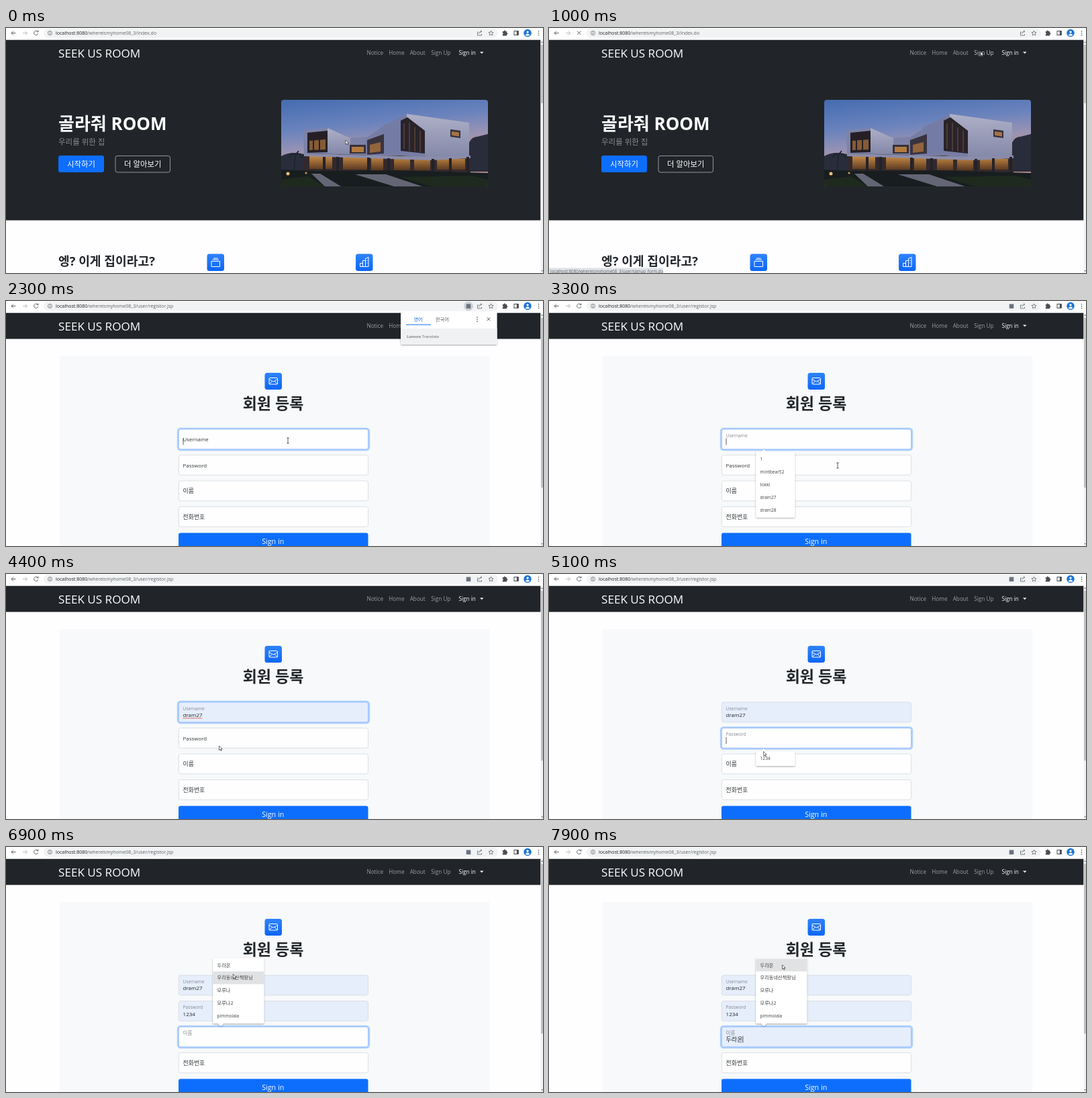
An HTML page for the animation above (8 s loop, 800 by 365 pixels).

```html
<!DOCTYPE html>
<html lang="ko">
<head>
<meta charset="utf-8">
<title>Sign up walkthrough</title>
<style>
  html, body { margin: 0; width: 100%; height: 100%; overflow: hidden; background: #fff; }
  svg { display: block; width: 800px; height: 365px; }
  text { font-family: "Open Sans", "Noto Sans CJK KR", "Noto Sans CJK", sans-serif; fill: #212529; white-space: pre; }
  .bold { font-weight: 700; }
  .mid { text-anchor: middle; }
  .nav text { font-size: 8.2px; fill: #9b9d9f; }
  .nav .on, .white { fill: #fff; }
  .line { fill: none; stroke: #5f6368; stroke-width: 1; }
  .glyph { fill: none; stroke: #fff; stroke-width: 1; stroke-linejoin: round; }
</style>
</head>
<body>
<svg viewBox="0 0 800 365">
  <defs>
    <linearGradient id="blue" x2="0" y2="1"><stop stop-color="#2f83fd"/><stop offset="1" stop-color="#0d66f5"/></linearGradient>
    <linearGradient id="sky" x2=".25" y2="1">
      <stop stop-color="#456cb0"/><stop offset=".35" stop-color="#6a83bd"/>
      <stop offset=".58" stop-color="#9a93b4"/><stop offset=".75" stop-color="#b88f92"/>
    </linearGradient>
    <linearGradient id="glow" x2="0" y2="1"><stop stop-color="#c68a45"/><stop offset="1" stop-color="#573620"/></linearGradient>
    <linearGradient id="wall" x2="0" y2="1"><stop stop-color="#aeb0c8"/><stop offset="1" stop-color="#8488a8"/></linearGradient>
    <clipPath id="photo"><rect x="410" y="107" width="308" height="129" rx="4"/></clipPath>
    <filter id="shadow" x="-20%" y="-20%" width="140%" height="150%">
      <feDropShadow dx="0" dy="1" stdDeviation="1.2" flood-opacity=".35"/>
    </filter>
  </defs>
  <rect width="800" height="365" fill="#fefdff"/>

  <g id="indexPage">
    <rect y="17.5" width="796.5" height="269" fill="#212529"/>
    <text x="78" y="152" font-size="26" class="bold white">골라줘 ROOM</text>
    <text x="78" y="174" font-size="11.5" style="fill:#8b8d90">우리를 위한 집</text>
    <rect x="78" y="190" width="68" height="25" rx="3" fill="#0d6efd"/>
    <text x="112" y="206.5" font-size="11.4" class="mid white">시작하기</text>
    <rect x="163" y="190.5" width="81.5" height="24.5" rx="3" fill="none" stroke="#c4c6c8" stroke-width=".7"/>
    <text x="203.7" y="206.5" font-size="11.4" class="mid white">더 알아보기</text>

    <g clip-path="url(#photo)">
      <rect x="410" y="107" width="308" height="129" fill="url(#sky)"/>
      <path d="M410 191q14-8 34-3v30h-34zM688 176q4-14 14-14l16-4v56h-30z" fill="#292d3b"/>
      <path d="M444 182H692V220H444z" fill="#33292c"/>
      <path d="M452 191H486V210H452zM502 191H538V211H502zM544 193H562V212H544zM578 195H602V212H578zM608 195H632V212H608zM642 195H684V211H642z" fill="url(#glow)"/>
      <path d="M443 152l36-3 34 15 24-2v27l-93-2z" fill="#7d83a8"/>
      <path d="M479 149l34 15v24l-34-2z" fill="url(#wall)"/>
      <path d="M449 156l30-3v32l-30 1z" fill="#251f25"/>
      <path d="M452 168l24-2v15l-24 1z" fill="#855b36"/>
      <path d="M458 156v29M467 155v30" stroke="#251f25" stroke-width="2"/>
      <path d="M512 174h24v13h-24z" fill="#37303a"/><path d="M515 177h18v8h-18z" fill="#b27a40"/>
      <path d="M536 164l30-20 31-16 93 13v50l-62 3-40-4-52 1z" fill="#777da3"/>
      <path d="M597 128l93 13v50l-66 2v-36l-27-20z" fill="url(#wall)"/>
      <path d="M557 148l33-16v53l-33 3z" fill="#747ca6"/>
      <path d="M588 138l10-5 26 20v34l-36-4z" fill="#29232a"/>
      <path d="M593 142v38M601 141v42M609 148v36M617 153v32" stroke="#5c4238" stroke-width="1.5"/>
      <path d="M662 151l15 2v11l-15-2z" fill="#373039"/><path d="M664 154l11 1.500v6l-11-1.500z" fill="#a37347"/>
      <path d="M538 167l25-9v29l-25 2z" fill="#39333f"/><path d="M542 174l16-4v14l-16 2z" fill="#93653c"/>
      <path d="M444 187l190 5 58-2v4l-58 3-190-6z" fill="#8a8caa"/>
      <path d="M474 192v22M494 192v22M540 193v22M570 194v24M636 195v24M662 194v22M688 192v22" stroke="#242229" stroke-width="4"/>
      <path d="M410 211l55 2 115-1 138 4v20H410z" fill="#181e20"/>
      <path d="M455 217h13l31 19h-24zM520 218h46l54 18h-42z" fill="#646675"/>
      <path d="M410 226l40-5 24 15h-64zM588 222l106-2 24 6v10h-84z" fill="#1e2a1d"/>
      <path d="M429 213l2-25m-9 5q5-8 9-4 6-5 11 5M424 187l7 2 5-6" fill="none" stroke="#1f252a" stroke-width="1.8"/>
      <circle cx="420" cy="217" r="2.500" fill="#f0bd70"/><circle cx="447" cy="216" r="1.500" fill="#d99f55"/>
    </g>

    <text x="78" y="353.5" font-size="18.2" class="bold">엥? 이게 집이라고?</text>
    <rect x="299.5" y="336.5" width="25.5" height="25.5" rx="3.5" fill="url(#blue)"/>
    <path class="glyph" d="M306 347.500h12.500v8h-12.500zM307.500 345h9.500M309 343h6.500"/>
    <rect x="521" y="336.500" width="25.500" height="25.500" rx="3.500" fill="url(#blue)"/>
    <path class="glyph" d="M527.500 355.500v-5h4v-4h4v-3l4.500-2v14zM531.500 350v5M535.500 346v9M537.800 346v1M537.800 349.500v1"/>
  </g>

  <g id="formPage">
    <rect y="17.5" width="796.5" height="39" fill="#212529"/>
    <rect x="80" y="82" width="640" height="283" fill="#f7f9fa"/>
    <rect x="385.500" y="107" width="25.500" height="25" rx="3.500" fill="url(#blue)"/>
    <path class="glyph" d="M392 115.500q0-1 1-1h10.500q1 0 1 1v7.500q0 1-1 1H393q-1 0-1-1zM392 116.500l6.300 3.800 6.200-3.800M392.300 123.500l4.200-4M404.200 123.500l-4.200-4"/>
    <text x="398" y="161" font-size="23" class="bold mid">회원 등록</text>
    <rect x="257" y="345.500" width="282.500" height="30" rx="3" fill="#0d6efd"/>
    <text x="397.700" y="362" font-size="10.700" class="mid white">Sign in</text>
  </g>

  <g class="nav">
    <text x="78" y="43.800" class="white" style="font-size:17.100px;fill:#fff">SEEK US ROOM</text>
    <text x="537.500" y="40">Notice</text><text x="570.300" y="40">Home</text><text x="601.700" y="40">About</text>
    <text id="signUp" x="633.300" y="40">Sign Up</text><text x="674.500" y="40" class="on">Sign in</text>
    <path d="M706 35.500h5.500l-2.750 2.800z" fill="#fff"/>
  </g>

  <rect x="796.5" y="17" width="3.5" height="348" fill="#f1f1f1"/>
  <rect id="thumb" x="797" y="25" width="3" fill="#c1c1c1"/>
  <path d="M797.300 22l1.300-2 1.300 2zM797.300 361l1.300 2 1.300-2z" fill="#777"/>

  <rect width="800" height="17.5" fill="#fff"/>
  <rect x="56" y="1" width="677" height="13.500" rx="6.700" fill="#f1f3f4"/>
  <path class="line" d="M14.500 7.500H8m3-3l-3 3 3 3"/>
  <path class="line" d="M25 7.500h6.500m-3-3l3 3-3 3" style="stroke:#bcbfc3"/>
  <path id="reload" class="line" d="M47.300 5.300a3.200 3.200 0 1 0 .6 3M48 3.500v2.300h-2.300"/>
  <path id="stop" class="line" d="M42 4.500l5.500 5.500m0-5.500L42 10"/>
  <circle class="line" cx="65.500" cy="7.500" r="3" style="stroke-width:.8"/><path class="line" d="M65.500 7v2.200M65.500 5.500v.8" style="stroke-width:.9"/>
  <text x="74" y="10.200" font-size="7" style="fill:#5f6368"><tspan fill="#202124">localhost:8080</tspan><tspan id="path"></tspan></text>
  <circle id="halo" cx="689" cy="7.800" r="7" fill="#cfd2d6"/>
  <rect id="translate" x="685.700" y="4.500" width="6.600" height="6.600" fill="#6b7280"/>
  <path class="line" d="M704 6h-1.500v5h6V9M704.500 8.500q.5-3.500 4-3.500m-1.500-1.500l1.800 1.500-1.800 1.700" style="stroke-width:.8"/>
  <path class="line" d="M722.500 4l1.100 2.400 2.500.3-1.900 1.700.5 2.500-2.200-1.300-2.200 1.300.5-2.500-1.900-1.700 2.500-.3z" style="stroke-width:.8"/>
  <path d="M739.800 5h2v-.5a1.100 1.100 0 0 1 2.200 0V5h2v2.200h.4a1.100 1.100 0 0 1 0 2.200H746v2h-6.200V9.300a1 1 0 0 0 0-2z" fill="#4a4d51"/>
  <rect class="line" x="757" y="4.500" width="6.300" height="6" style="stroke:#4a4d51"/><path d="M760.800 4.500h2.500v6h-2.500z" fill="#4a4d51"/>
  <circle cx="777" cy="7.500" r="5.700" fill="#1a73d8"/><circle cx="777" cy="6" r="1.700" fill="#fff"/><path d="M773.500 10.500q3.500-4 7 0-3.500 2.500-7 0" fill="#fff"/>
  <path d="M793.500 4v7.500" stroke="#5f6368" stroke-width="1.400" stroke-dasharray="1.400 1.600"/>

  <g id="live"></g>

  <g id="bubble">
    <g filter="url(#shadow)"><rect x="588" y="15.500" width="143.500" height="49.500" rx="2" fill="#fff"/></g>
    <path d="M588 41h143.500v22a2 2 0 0 1-2 2H590a2 2 0 0 1-2-2z" fill="#f0f1f2"/>
    <text x="614" y="29.500" font-size="7.200" class="mid" style="fill:#1a73e8">영어</text>
    <text x="650" y="29.500" font-size="7.200" class="mid" style="fill:#5f6368">한국어</text>
    <path d="M596 35.300h37" stroke="#1a73e8"/>
    <path d="M702 23.500v7.500" stroke="#5f6368" stroke-width="1.400" stroke-dasharray="1.400 1.600"/>
    <path class="line" d="M716.500 24.700l4.700 4.700m0-4.700l-4.700 4.700"/>
    <text x="597" y="55" font-size="6.200" style="font-family:Roboto,sans-serif;fill:#777"><tspan font-weight="500">Lumora</tspan> Translate</text>
  </g>
  <g id="status">
    <path id="statusBox" fill="#dee1e6"/>
    <text id="link" x="2" y="364.700" font-size="6.200" style="fill:#5f6368"></text>
  </g>
  <g id="arrow"><path transform="scale(.82)" d="M0 0v8l1.900-1.700 1.300 2.900 1.300-.6-1.300-2.800h2.600z" fill="#fff" stroke="#222" stroke-width=".8"/></g>
  <g id="beam"><path d="M-1.700-4H1.700M-1.700 4H1.700M0-4V4" stroke="#333" stroke-width=".8"/></g>
</svg>

<script>
const LOOP = 8000, PAGE_AT = 1200, SITE = '/whereismyhome08_3/';
const $ = id => document.getElementById(id);
const show = (id, on) => $(id).setAttribute('visibility', on ? 'visible' : 'hidden');
const within = (t, from, to) => t >= from && t < to;
const clamp = v => Math.min(1, Math.max(0, v));
const mix = (a, b, k) => a + (b - a) * k;
const ctx = document.createElement('canvas').getContext('2d');
const korean = s => /[가-힣]/.test(s);

const fields = [
  { label: 'Username', value: 'dram27', focus: 2300, blur: 4800, fill: 3500, commit: 3900, spell: true },
  { label: 'Password', value: '1234', focus: 4800, blur: 6300, fill: 5200, commit: 5350 },
  { label: '이름', value: '두라온', focus: 6300, blur: LOOP, fill: 7000, commit: 7800 },
  { label: '전화번호', focus: Infinity, blur: Infinity, fill: Infinity }
];
fields.forEach((f, i) => f.y = 191 + i * 38.5);

const ROW = 18.9;
const menus = [
  { y: 226, w: 58, from: 2600, to: 3900, tip: 'M316 225l4-4 4 4z', rows: ['1', 'mintbear52', 'tokki', 'dram27', 'dram28'] },
  { y: 265, w: 58, from: 5000, to: 5350, tip: 'M316 264l4-4 4 4z', rows: ['1234'] },
  { y: 166.5, w: 76, from: 6400, to: LOOP, tip: 'M316 263l4 4 4-4z', rows: ['두라온', '우리동네산책왕님', '모루나', '모루나2', 'pimmolala'] }
];

// time, x, y
const track = [
  [0, 506, 167], [100, 506, 167], [800, 643, 35], [1050, 643, 35], [1200, 549, 36],
  [1400, 150.5, 282], [1900, 300, 240], [2250, 420, 208], [2500, 420, 208], [2700, 430, 245],
  [3330, 430, 245], [3600, 344, 292], [3900, 344, 292], [4400, 317.5, 256], [4600, 317.5, 256],
  [4750, 300, 246], [4950, 300, 246], [5200, 330, 274], [5500, 330, 274], [6050, 288, 283],
  [6400, 288, 283], [7050, 346, 175], [7330, 346, 175], [7400, 347.5, 175.5], [LOOP, 347.5, 175.5]
];

function cursorAt(t) {
  const i = track.findIndex(p => p[0] > t), a = track[i - 1], b = track[i];
  const k = (t - a[0]) / (b[0] - a[0]), ease = k * k * (3 - 2 * k);
  return [mix(a[1], b[1], ease), mix(a[2], b[2], ease)];
}

const text = (x, y, size, s, color = '#212529') =>
  `<text x="${x}" y="${y}" font-size="${size}" style="fill:${color}">${s}</text>`;

function drawField(f, t) {
  const focused = within(t, f.focus, f.blur), filled = t >= f.fill, y = f.y;
  const lift = clamp((t - f.focus) / 100), size = korean(f.label) ? 8.9 : 7.9;
  let out = '';
  if (focused) out += `<rect x="256" y="${y - 1}" width="285" height="32" rx="4" fill="none" stroke="#0d6efd" stroke-opacity=".3" stroke-width="2.4"/>`;
  out += `<rect x="257.3" y="${y}" width="282.2" height="29.8" rx="3" fill="${filled ? '#e6eefb' : '#fefefe'}" stroke="${focused ? '#86b7fe' : '#d5dae0'}" stroke-width=".8"/>`;
  out += text(263.6, y + mix(18, 11.8, lift), size * mix(1, .84, lift), f.label, lift > .5 ? '#868b92' : '#30353a');
  const valueSize = korean(f.value || '') ? 9 : 8;
  ctx.font = `${valueSize}px "Open Sans", "Noto Sans CJK KR", "Noto Sans CJK", sans-serif`;
  const end = 263.6 + (filled ? ctx.measureText(f.value).width : 0);
  if (filled) out += text(263.6, y + 22, valueSize, f.value);
  const blinkFrom = t >= f.commit ? f.commit : f.focus;
  if (focused && (!filled || t >= f.commit) && (t - blinkFrom) % 1000 < 500)
    out += `<path d="M${end + .4} ${y + 13.5}v10" stroke="#333" stroke-width=".8"/>`;
  if (f.spell && focused && t >= f.commit)
    out += `<path d="M263.6 ${y + 23.8}H${end}" stroke="#e0603f" stroke-width="1.2" stroke-dasharray="1.2 .6"/>`;
  return out;
}

function rowUnder(menu, x, y) {
  const inside = x > 308 && x < 308 + menu.w && y > menu.y;
  return inside ? Math.floor((y - menu.y) / ROW) : -1;
}

function drawMenu(m, x, y) {
  const hover = rowUnder(m, x, y), height = m.rows.length * ROW + 3;
  let out = `<g filter="url(#shadow)"><rect x="308.3" y="${m.y - 1}" width="${m.w}" height="${height}" rx="1.5" fill="#fff"/><path d="${m.tip}" fill="#fff"/></g>`;
  m.rows.forEach((s, i) => {
    const top = m.y + i * ROW;
    if (i === hover) out += `<rect x="308.3" y="${top}" width="${m.w}" height="${ROW}" fill="#e1e2e3"/>`;
    out += text(314.6, top + 12, korean(s) ? 7.2 : 6.6, s, '#3c4043');
  });
  return out;
}

function drawStatus(t) {
  const toNotice = within(t, PAGE_AT, 1600);
  const right = toNotice ? 155 : 170;
  show('status', toNotice || within(t, 850, PAGE_AT));
  $('statusBox').setAttribute('d', `M0 357.5H${right - 2}q2 0 2 2V365H0z`);
  $('link').textContent = 'localhost:8080' + SITE + (toNotice ? 'notice/notice.do' : 'user/signup_form.do');
}

function render(t) {
  const onForm = t >= PAGE_AT, [x, y] = cursorAt(t);
  const open = menus.filter(m => within(t, m.from, m.to));
  show('indexPage', !onForm);
  show('formPage', onForm);
  $('thumb').setAttribute('height', onForm ? 253 : 87);
  $('path').textContent = SITE + (onForm ? 'user/registor.jsp' : 'index.do');

  const loading = within(t, 950, 1300);
  show('stop', loading);
  show('reload', !loading);
  show('translate', t >= 1300);
  show('halo', within(t, 1300, 2800));
  show('bubble', within(t, 1300, 2400));
  $('signUp').style.fill = within(t, 780, 1100) ? '#c8c9ca' : '';
  drawStatus(t);

  $('live').innerHTML = onForm
    ? fields.map(f => drawField(f, t)).join('') + open.map(m => drawMenu(m, x, y)).join('') : '';

  const overMenu = open.some(m => within(rowUnder(m, x, y), 0, m.rows.length));
  const typing = onForm && !overMenu && fields.some(f => x > 258 && x < 539 && y > f.y + 1 && y < f.y + 26);
  show('beam', typing);
  show('arrow', !typing);
  $(typing ? 'beam' : 'arrow').setAttribute('transform', `translate(${x} ${y})`);
}

const start = performance.now();
function tick() {
  render((performance.now() - start) % LOOP);
  requestAnimationFrame(tick);
}
tick();
</script>
</body>
</html>
```
